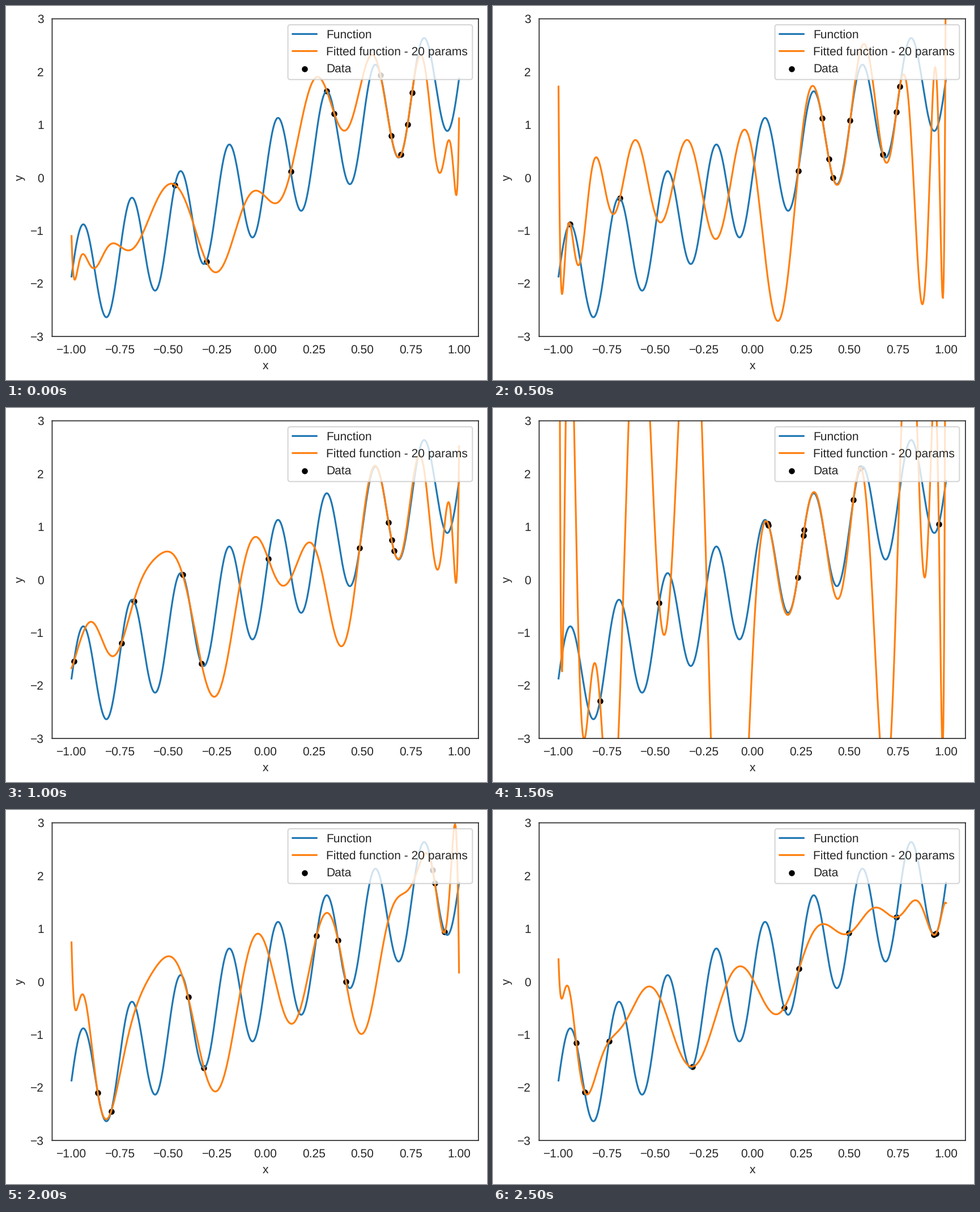
Write a matplotlib script that moves like this. It is 849 px wide and 660 px high and loops after 3000 ms.

```python
import matplotlib.pyplot as plt
import numpy as np
from matplotlib.animation import FuncAnimation
from numpy.polynomial.legendre import legvander

W, H, DPI = 849, 660, 128
S = 151.7 / DPI  # point sizes below are meant for 151.7 dpi
PARAMS = 20

plt.rcParams.update({
    "font.family": "Liberation Sans",
    "font.size": 10 * S,
    "text.color": ".15",
    "text.hinting": "none",
    "axes.labelcolor": ".15",
    "axes.edgecolor": ".15",
    "axes.linewidth": 0.8 * S,
    "axes.labelpad": 4 * S,
    "lines.linewidth": 1.5 * S,
    "patch.linewidth": 1.0 * S,
    "path.snap": False,
})

# Positions of the ten random samples in each trial.
SAMPLES = [
    [-.4658, -.3045, .1315, .318, .3562, .5949, .6494, .7011, .7347, .7574],
    [-.94, -.683, .2372, .3605, .3949, .4168, .5054, .674, .7438, .7618],
    [-.9874, -.7424, -.6786, -.4262, -.329, .015, .4872, .6361, .6519, .664],
    [-.7861, -.4805, .081, .084, .2337, .2638, .268, .522, .56, .9625],
    [-.8643, -.7955, -.398, -.3165, .2652, .3759, .4163, .8641, .875, .926],
    [-.9085, -.8652, -.7397, -.3083, .1643, .2417, .4993, .743, .9377, .948],
]


def wave(x):
    return 2 * x + np.sin(25 * x)


def features(x):
    """Legendre polynomials of degree 1 to PARAMS."""
    return legvander(x, PARAMS)[:, 1:]


def fit(x):
    """Minimum-norm least squares: more parameters than samples."""
    coef = np.linalg.lstsq(features(x), wave(x), rcond=None)[0]
    return features(grid) @ coef


grid = np.linspace(-1, 1, 1000)
trials = [np.array(xs) for xs in SAMPLES]
curves = [fit(x) for x in trials]

fig = plt.figure(figsize=(W / DPI, H / DPI), dpi=DPI, facecolor="white")
ax = fig.add_axes([81.45 / W, 76.8 / H, 752.4 / W, 560.6 / H])
ax.set(xlim=(-1.1, 1.1), ylim=(-3, 3), xlabel="x", ylabel="y")
ax.set_xticks(np.linspace(-1, 1, 9))
ax.set_yticks(range(-3, 4))
ax.tick_params(bottom=False, left=False, length=3.5 * S, pad=3.5 * S,
               labelcolor=".15")

ax.plot(grid, wave(grid), color="#1f77b4", label="Function")
fitted, = ax.plot(grid, curves[0], color="#ff7f0e",
                  label=f"Fitted function - {PARAMS} params")
dots = ax.scatter(trials[0], wave(trials[0]), s=16 * S**2, color="black",
                  label="Data")
ax.legend(loc="upper right")


def update(i):
    x = trials[i]
    dots.set_offsets(np.column_stack([x, wave(x)]))
    fitted.set_ydata(curves[i])
    return fitted, dots


anim = FuncAnimation(fig, update, frames=len(trials), interval=500,
                     repeat=True, repeat_delay=0)
plt.show()
```
